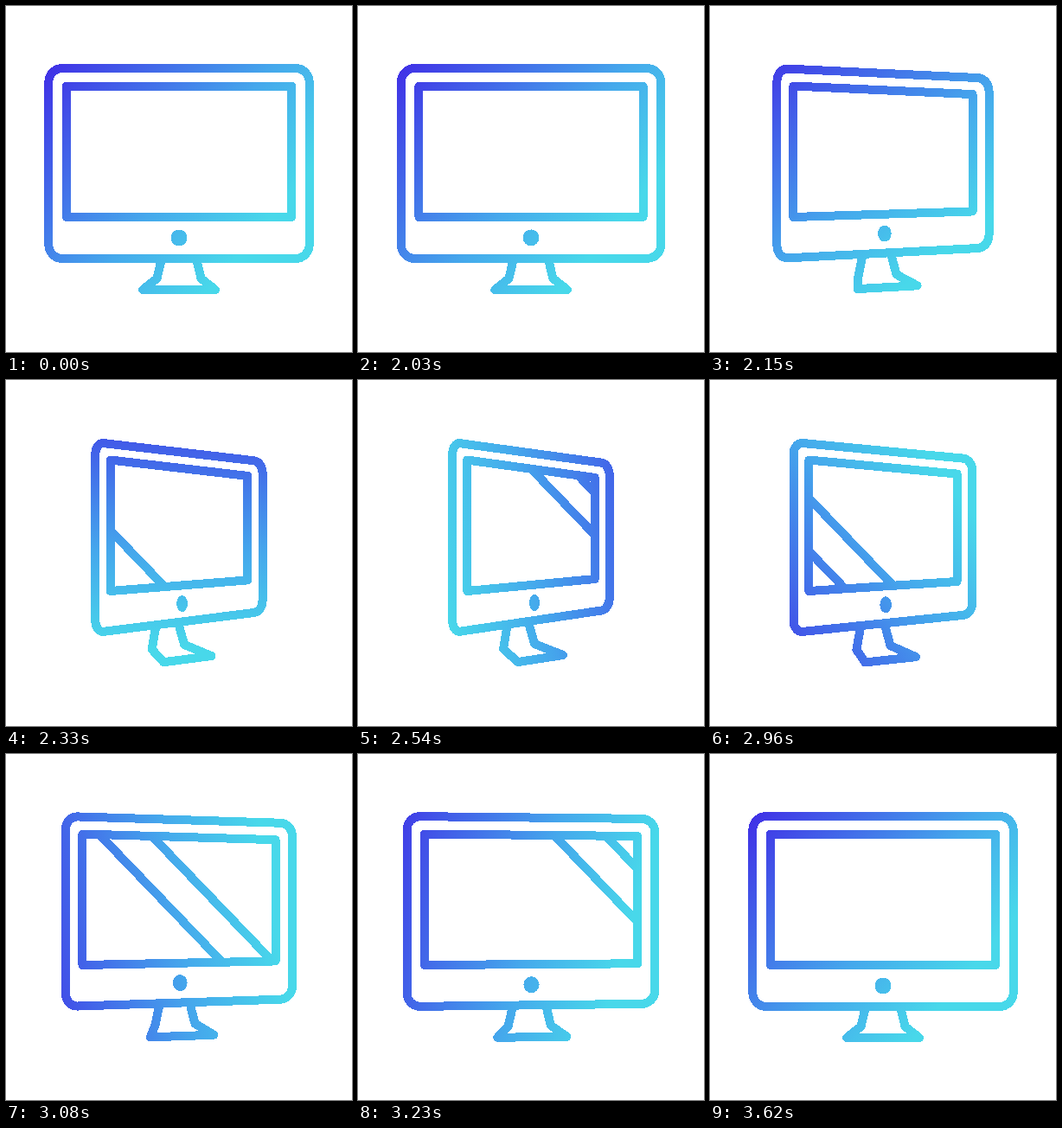
Write an HTML page that moves like this. It is 400 by 400 pixels and loops after 3650 ms.

```html
<!DOCTYPE html>
<html lang="en">
<head>
<meta charset="utf-8">
<title>Turning monitor</title>
<style>
  html, body { margin: 0; width: 100%; height: 100%; overflow: hidden; background: #fff; }
  svg { display: block; width: 100%; height: 100%; }
</style>
</head>
<body>
<svg viewBox="0 0 400 400" shape-rendering="crispEdges">
  <defs>
    <linearGradient id="tint" gradientUnits="userSpaceOnUse">
      <stop offset="0" stop-color="#4030e6"/>
      <stop offset=".645" stop-color="#45a8ec"/>
      <stop offset="1" stop-color="#48d8ea"/>
    </linearGradient>
    <clipPath id="glass"><path id="pane"/></clipPath>
  </defs>
  <g fill="none" stroke="url(#tint)" stroke-width="10" stroke-linecap="round" stroke-linejoin="round">
    <g clip-path="url(#glass)"><path id="gloss"/></g>
    <path id="stand"/>
    <path id="frame"/>
    <path id="screen"/>
  </g>
  <ellipse id="dot" fill="url(#tint)"/>
</svg>
<script>
const LOOP = 3650, START = 2000, STEP = 30, END = 1620, HALF = END / 2;
const el = id => document.getElementById(id);
const mix = (a, b, k) => a + (b - a) * k;
const line = pts => "M" + pts.join("L");

// Timing curve with control points (x1, 0) and (x2, 1)
function ease(x, x1, x2) {
  if (x <= 0 || x >= 1) return x <= 0 ? 0 : 1;
  let lo = 0, hi = 1, q = 0.5;
  for (let i = 0; i < 30; i++) {
    q = (lo + hi) / 2;
    const r = 1 - q;
    if (3 * r * r * q * x1 + 3 * r * q * q * x2 + q * q * q < x) lo = q; else hi = q;
  }
  return q * q * (3 - 2 * q);
}

// Panel in perspective: the right side shrinks as it turns away
function panel(half, top, bottom, dropTop, dropBottom) {
  const l = 200 - half, r = 200 + half;
  return [[l, top], [r, top + dropTop], [r, bottom - dropBottom], [l, bottom]];
}

// Closed quad with corners of radius rx along its long edges, ry along its sides
function rounded(pts, rx, ry) {
  const toward = (a, b, d) => {
    const k = d / Math.hypot(b[0] - a[0], b[1] - a[1]);
    return [mix(a[0], b[0], k), mix(a[1], b[1], k)];
  };
  return pts.map((p, i) => {
    const prev = pts[(i + 3) % 4], next = pts[(i + 1) % 4];
    const [a, b] = i % 2 ? [rx, ry] : [ry, rx];
    return (i ? "L" : "M") + toward(p, prev, a) + "C" +
      [toward(p, prev, a * 0.45), toward(p, next, b * 0.45), toward(p, next, b)].join(" ");
  }).join("") + "Z";
}

// Stand: x, y facing front, then the shift when turned
const legs = [
  [179, 296, -7, -9], [174.5, 315, -6.5, -4], [158, 328, 27, -2],
  [242, 328, -5, -10], [225.5, 315, -21.5, -10], [221, 296, -23, -12]
];

// Horizontal offsets of the two reflections, one sweep per half
function glossAt(s) {
  if (s < HALF - 70) {
    const run = t => -53 + 1.132 * t - 0.00097 * t * t;
    return [run(s - 330), run(s - 390)];
  }
  const lead = -23.5 + 0.787 * (s - 960);
  return [lead, lead - 59];
}

function set(id, attrs) {
  for (const k in attrs) el(id).setAttribute(k, attrs[k]);
}

function draw(s) {
  const turn = s < HALF ? ease(s / 600, 0.36, 0) : 1 - ease((s - HALF) / HALF, 0.36, 0);
  const angle = (-50 + 360 * ease(s / END, 0.333, 0.42)) * Math.PI / 180;
  const dx = -Math.sin(angle), dy = Math.cos(angle);
  set("tint", {
    x1: 200 - 200 * dx, y1: 200 - 200 * dy,
    x2: 200 + 110 * dx, y2: 200 + 110 * dy
  });

  const pane = line(panel(mix(130, 73.5, turn), 92.5, 244, 20.5 * turn, 14 * turn)) + "Z";
  set("screen", { d: pane });
  set("pane", { d: pane });
  const shell = panel(mix(150.7, 90.5, turn), 72, 292, 25 * turn, 27 * turn);
  set("frame", { d: rounded(shell, mix(16, 9, turn), mix(16, 13, turn)) });
  set("stand", { d: line(legs.map(([x, y, sx, sy]) => [x + sx * turn, y + sy * turn])) });
  set("dot", {
    cx: 200 + 4 * turn, cy: 268 - 10.5 * turn, rx: 9.5 - 3.5 * turn, ry: 9.5
  });

  const bars = s > 0 && s < END
    ? glossAt(s).map(c => line([[c + 70, 66], [c + 270, 274]])).join("")
    : "";
  set("gloss", { d: bars });
}

function tick() {
  const t = performance.now() % LOOP;
  draw(Math.min(END, Math.max(0, Math.floor((t - START) / STEP) * STEP)));
  requestAnimationFrame(tick);
}
tick();
</script>
</body>
</html>
```
